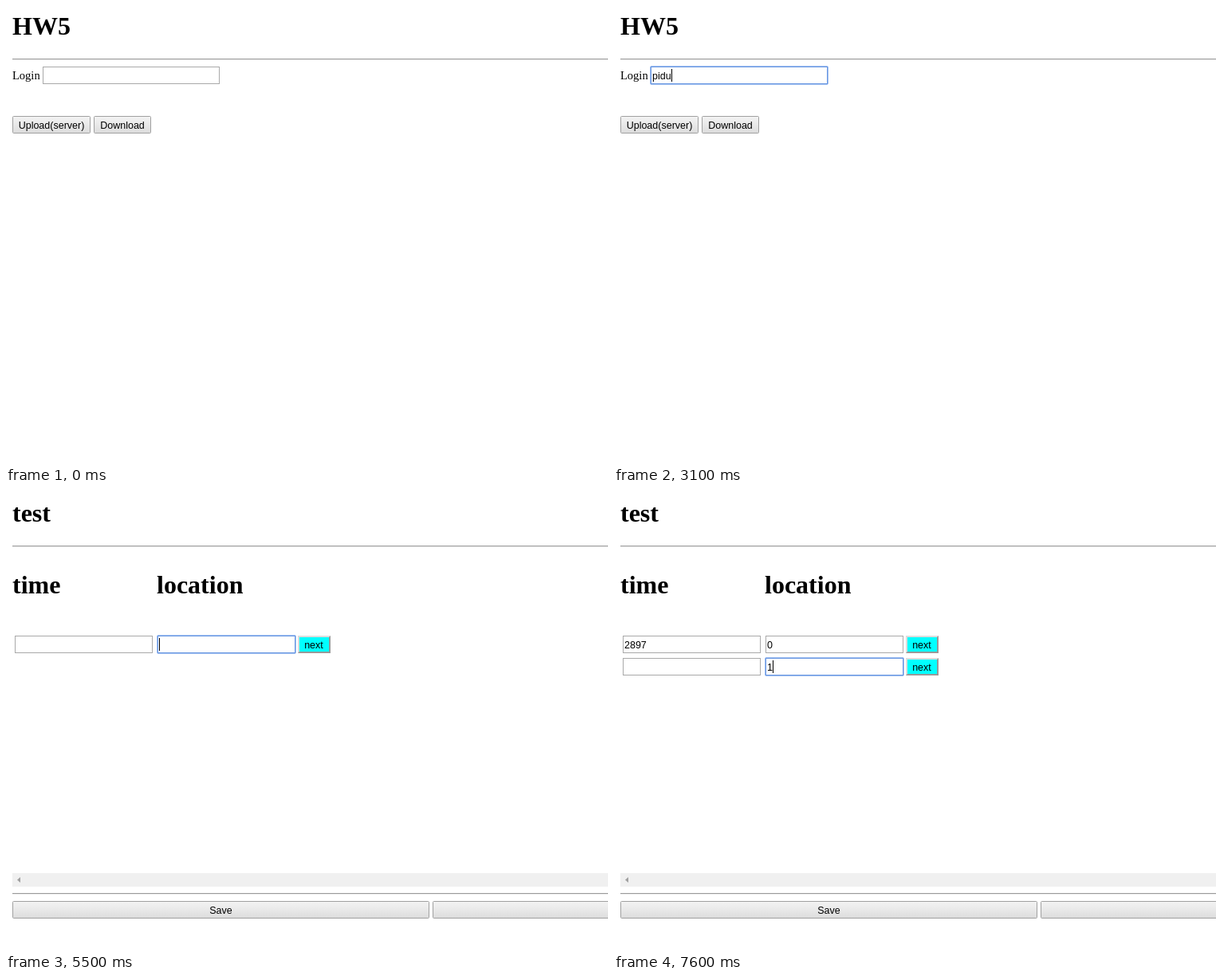
Recreate the animation shown at these times as an HTML page. Size 755x576 px, loop 8000 ms.

```html
<!DOCTYPE html>
<html lang="en">
<head>
<meta charset="utf-8">
<title>Login form</title>
<style>
  html, body { margin: 0; width: 100%; height: 100%; overflow: hidden; background: #fff; }
  svg { display: block; width: 755px; height: 576px; }
  text { fill: #000; white-space: pre; }
  .h { font: bold 32px "Liberation Serif", "Times New Roman", serif; }
  .p { font: 14.5px "Liberation Serif", "Times New Roman", serif; }
  .ui { font: 12.5px "Liberation Sans", Arial, sans-serif; }
  .menu { font: 13.3px "Open Sans", sans-serif; }
</style>
</head>
<body>
<svg viewBox="0 0 755 576">
  <defs>
    <linearGradient id="face" x2="0" y2="1">
      <stop offset="0" stop-color="#f3f3f3"/>
      <stop offset=".4" stop-color="#ebebeb"/>
      <stop offset="1" stop-color="#dcdcdc"/>
    </linearGradient>
    <linearGradient id="down" x2="0" y2="1">
      <stop offset="0" stop-color="#d8d8d8"/>
      <stop offset="1" stop-color="#e8e8e8"/>
    </linearGradient>
  </defs>
  <g id="page"></g>
</svg>
<script>
const LOOP = 8000;
const NAME = "pidu";
const page = document.getElementById("page");
const pen = document.createElement("canvas").getContext("2d");
pen.font = '12.5px "Liberation Sans", Arial, sans-serif';

const rect = (x, y, w, h, fill) =>
  `<rect x="${x}" y="${y}" width="${w}" height="${h}" fill="${fill}"/>`;
const frame = (x, y, w, h, stroke, fill = "none", r = 0) =>
  `<rect x="${x + .5}" y="${y + .5}" width="${w - 1}" height="${h - 1}" rx="${r}" fill="${fill}" stroke="${stroke}"/>`;
const text = (cls, x, y, s, anchor = "start") =>
  `<text class="${cls}" x="${x}" y="${y}" text-anchor="${anchor}">${s}</text>`;
const rule = y => rect(8, y, 747, 1, "#9a9a9a") + rect(8, y + 1, 747, 1, "#eee");
const ring = (x, y, w, h) =>
  frame(x - 1, y - 1, w + 2, h + 2, "#9dbdf0", "none", 1.5) + frame(x, y, w, h, "#6a98e2");

function input(x, y, w, value, focus, caret) {
  let s = frame(x, y, w, 22, "#a9a9a9", "#fff");
  if (focus) s += ring(x, y, w, 22);
  if (value) s += text("ui", x + 2, y + 16, value);
  if (caret) s += rect(x + 2 + Math.round(pen.measureText(value).width), y + 3, 1, 16, "#000");
  return s;
}

function button(x, y, w, label, state = "idle") {
  const edge = state === "idle" ? "#a0a0a0" : "#747474";
  const face = state === "pressed" ? "url(#down)" : "url(#face)";
  return frame(x, y, w, 22, edge, face, 1) + text("ui", x + w / 2, y + 16, label, "middle");
}

function nextButton(y, focus, pressed) {
  const x = 366, w = 41, h = 22;
  const [light, dark] = pressed ? ["#989898", "#ddd"] : ["#ddd", "#989898"];
  return rect(x, y, w, h, light) +
    `<path d="M${x + w} ${y}v${h}h${-w}l2 -2h${w - 4}v${4 - h}z" fill="${dark}"/>` +
    rect(x + 2, y + 2, w - 4, h - 4, "#0ff") +
    text("ui", x + w / 2 - .5, y + 16, "next", "middle") +
    (focus ? ring(x, y, w, h) : "");
}

// The caret shows for the first half second after each restart.
const caretOn = (t, starts) => starts.some(s => t >= s && t < s + 500);

function loginPage(t) {
  const typed = [1800, 1900, 2300, 3100].filter(k => t >= k).length;
  const focus = t >= 500 && t < 4100;
  const hover = t < 3900 ? "idle" : t >= 4100 && t < 4200 ? "pressed" : "hover";
  const menu = t >= 600 && t < 1800;
  return text("h", 8, 36, "HW5") + rule(66) + text("p", 8, 92, "Login") +
    (menu ? frame(46, 97, 222, 27, "#d4d4d4", "#fff") +
            text("menu", 54.5, 116, "'HAVING 1=1--") : "") +
    input(46, 76, 222, NAME.slice(0, typed), focus,
      focus && caretOn(t, [500, 1500, 1900, 2300, 3100])) +
    button(8, 138, 98, "Upload(server)", hover) +
    button(110, 138, 72, "Download");
}

function recordPage(t) {
  const first = t >= 5500 && t < 6800;
  const second = t >= 7400;
  const added = t >= 6900;
  let s = text("h", 8, 36, "test") + rule(66) +
    text("h", 8, 126, "time") + text("h", 189, 126, "location") +
    input(11, 179, 173, added ? "2897" : "") +
    input(190, 179, 173, t >= 6300 ? "0" : "", first, first && caretOn(t, [5500, 6300])) +
    nextButton(179, t >= 6800 && t < 7400, t >= 6800 && t < 6900);
  if (added) {
    s += input(11, 207, 173, "") +
      input(190, 207, 173, t >= 7600 ? "1" : "", second, second) +
      nextButton(207);
  }
  return s + rect(8, 477, 747, 17, "#f0f0f0") +
    `<path d="M14 485.5l4 -3.5v7z" fill="#a0a0a0"/>` +
    rule(502) + button(8, 512, 523, "Save") + button(535, 512, 523, "");
}

let shown = "";
function draw(t) {
  const s = t < 4300 ? loginPage(t) : recordPage(t);
  if (s !== shown) page.innerHTML = shown = s;
}

const start = performance.now();
function tick() {
  draw((performance.now() - start) % LOOP);
  requestAnimationFrame(tick);
}
tick();
</script>
</body>
</html>
```
